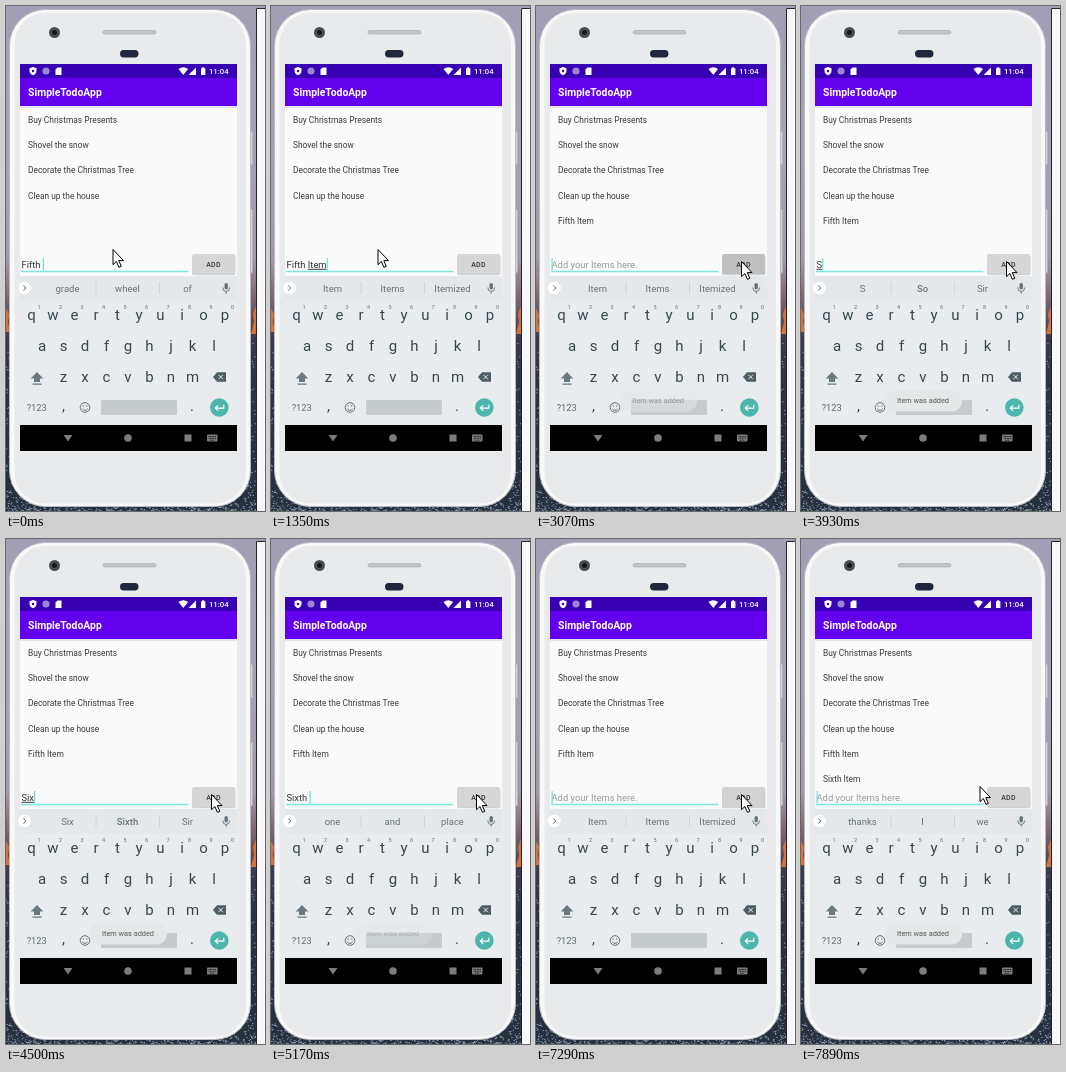
Recreate the animation shown at these times as an HTML page. Size 259 px wide and 505 px high, loop 8000 ms.

```html
<!DOCTYPE html>
<html lang="en">
<head>
<meta charset="utf-8">
<title>Todo app</title>
<style>
  html, body { margin: 0; height: 100%; overflow: hidden; }
  svg { display: block; width: 100vw; height: 100vh; font-family: Roboto, sans-serif; }
  text { white-space: pre; }
  .mid { text-anchor: middle; }
  .bold { font-weight: 500; }
  .item { font-size: 8.4px; fill: #3a3a3a; }
  .field { font-size: 9.4px; fill: #333; }
  .composing { text-decoration: underline; }
  .word { font-size: 9.5px; fill: #66727a; }
  .key { font-size: 15px; fill: #37474f; }
  .digit { font-size: 5.5px; fill: #65727a; }
</style>
</head>
<body>
<svg viewBox="0 0 259 505" preserveAspectRatio="none">
  <defs>
    <linearGradient id="dusk" x2="0" y2="1">
      <stop offset="0" stop-color="#a19fb5"/>
      <stop offset=".3" stop-color="#a6a1b7"/>
      <stop offset=".5" stop-color="#a598a8"/>
      <stop offset=".58" stop-color="#7d6470"/>
      <stop offset=".66" stop-color="#3a3a4d"/>
      <stop offset=".75" stop-color="#2b3345"/>
      <stop offset="1" stop-color="#27303f"/>
    </linearGradient>
  </defs>

  <!-- Desktop -->
  <rect width="259" height="505" fill="url(#dusk)"/>
  <path d="M0 302l3 6-1 8 2 10H0zM250 300l-3 8 1 8-3 12h5z" fill="#d5713c"/>
  <path id="snow" fill="#8f9bb0"/>
  <path d="M250 505V2h9V505z" fill="#f8f8fa"/>
  <path d="M250.5 505V2.5H259" fill="none" stroke="#23232b"/>

  <!-- Phone -->
  <g fill="#d5d7da" stroke="#a9acb1" stroke-width=".6">
    <rect x="242" y="125" width="4.500" height="34" rx="1.500"/>
    <rect x="242" y="203" width="4.500" height="64" rx="1.500"/>
  </g>
  <rect x="3.500" y="3.500" width="241" height="497" rx="36" fill="#f8f8f9" stroke="#b9bac0"/>
  <rect x="8.500" y="7" width="231.500" height="490.500" rx="31" fill="#e8eaec"/>
  <circle cx="48.500" cy="26.500" r="5.500" fill="#4a4d52"/>
  <circle cx="48.500" cy="26.500" r="2.500" fill="#15171c"/>
  <rect x="97" y="24.500" width="53" height="3.500" rx="1.700" fill="#c2c4c7" stroke="#a5a8ac" stroke-width=".6"/>
  <rect x="114" y="44" width="18.500" height="7.500" rx="3.700" fill="#20273c"/>

  <!-- App -->
  <rect x="14" y="58" width="217" height="387" fill="#fafafa"/>
  <rect x="14" y="100" width="217" height="2" fill="#e6e3ee"/>
  <rect x="14" y="72" width="217" height="28" fill="#6200ee"/>
  <rect x="14" y="58" width="217" height="14" fill="#3700b3"/>
  <g fill="#fff">
    <path d="M27 61l3.500 1.300v2.500q0 3-3.500 4.500-3.500-1.500-3.500-4.500v-2.500z"/>
    <circle cx="27" cy="65" r="1.200" fill="#3700b3"/>
    <circle cx="40" cy="65" r="3.600" fill="#9c84d5"/>
    <path d="M49.500 63.500l2-2H55.500v7.500h-6z"/>
    <path d="M172.500 63q4.800-3.400 9.600 0l-4.800 6zM190 61.500v7.500h-7.500z"/>
    <path d="M195 62.300h1.200v-1h2v1h1.200V69H195z"/>
    <text class="bold" x="203" y="68" font-size="7.700">11:04</text>
    <text x="22" y="90" font-size="10.400" font-weight="700">SimpleTodoApp</text>
  </g>
  <g id="list"></g>
  <path d="M15 265.500H182.500" stroke="#7ee6de" stroke-width="1.500"/>
  <text id="field" class="field" x="15.500" y="261.800"></text>
  <rect id="caret" y="252" width="1.200" height="12.500" fill="#6be0d7"/>
  <rect x="186" y="249" width="43.500" height="20.300" rx="2" fill="#cfd0d1"/>
  <rect id="button" x="186.300" y="248" width="42.700" height="20" rx="1.500"/>
  <text class="mid bold" x="207.500" y="260.500" font-size="7" letter-spacing=".3" fill="#333">ADD</text>

  <!-- Keyboard -->
  <rect x="14" y="270" width="217" height="149" fill="#e8ecee"/>
  <rect x="14" y="270" width="217" height="24.500" fill="#e4e8ea"/>
  <circle cx="18.500" cy="282" r="6.300" fill="#fff"/>
  <path d="M17.300 279.500l2.500 2.500-2.500 2.500" fill="none" stroke="#55636b"/>
  <path d="M90 276v12M153.500 276v12" stroke="#c9ced1" stroke-width=".8"/>
  <g id="words"></g>
  <rect x="218.500" y="277" width="3.400" height="6.500" rx="1.700" fill="#66737a"/>
  <path d="M216.800 281.500q0 4 3.400 4t3.400-4M220.200 285.500v2.300" fill="none" stroke="#66737a" stroke-width=".9"/>
  <g id="keys"></g>
  <path d="M31 366l6.300 6.500h-3.300v3.500h-6v-3.500h-3.300zM26.500 377.500h9v1.200h-9z" fill="#6b787f"/>
  <path d="M207 371l4-4.800h9v9.600h-9z" fill="#4e5c63"/>
  <path d="M212.500 368.800l4.400 4.400m0-4.400l-4.400 4.400" stroke="#e8ecee"/>
  <text class="mid" x="30.700" y="404.800" font-size="9.300" fill="#5f6c73">?123</text>
  <g fill="none" stroke="#56646b" stroke-width=".9">
    <circle cx="79" cy="401.500" r="4.800"/>
    <path d="M76.300 402.800q2.700 3.200 5.400 0M77.200 399.200v1.400M80.800 399.200v1.400"/>
  </g>
  <rect x="95" y="394" width="76" height="15" rx=".8" fill="#c6cbcd"/>
  <circle cx="213.300" cy="401.500" r="9.300" fill="#4db6ac"/>
  <path d="M217.800 398.800v3.300h-8.500m2.800-2.800l-2.800 2.800 2.800 2.800" fill="none" stroke="#fff" stroke-width="1.200"/>
  <g id="toast">
    <rect x="83.500" y="384.500" width="77.500" height="21" rx="10" fill="#e5e8e9"/>
    <text x="96" y="396.800" font-size="7.350" fill="#555">Item was added</text>
  </g>

  <!-- Navigation bar -->
  <rect x="14" y="419" width="217" height="26"/>
  <g fill="#7c7c7c">
    <path d="M57.500 429h9l-4.500 6.500z"/>
    <circle cx="122" cy="432" r="3.800"/>
    <rect x="178.500" y="428.500" width="7" height="7"/>
    <rect x="201" y="428.500" width="10.500" height="7" rx=".8"/>
    <path d="M202.500 430.500h7.500M202.500 432.300h7.500M204 434.200h4.500" stroke="#000" stroke-width=".8" stroke-dasharray="1 .6"/>
  </g>
  <path id="mouse" d="M.5.5v15.200l3.400-3.200 2.500 5.800 2.400-1-2.500-5.700h4.700z" fill="#fff" stroke="#000"/>
</svg>
<script>
const DURATION = 8000;
const $ = id => document.getElementById(id);
const label = (cls, x, y, s) => `<text class="${cls}" x="${x}" y="${y}">${s}</text>`;

// Each table row starts at its time and holds until the next one.
const at = (table, t) => table.findLast(row => row[0] <= t);

// time, typed text, word being composed
const typing = [
  [0, "Fifth ", ""], [120, "Fifth ", "I"], [1110, "Fifth ", "It"], [1230, "Fifth ", "Ite"],
  [1350, "Fifth ", "Item"], [2830, "", ""], [3930, "", "S"], [4220, "", "Si"],
  [4500, "", "Six"], [4780, "", "Sixt"], [5020, "", "Sixth"], [5170, "Sixth ", ""],
  [5720, "Sixth ", "I"], [6120, "Sixth ", "It"], [6270, "Sixth ", "Ite"],
  [6390, "Sixth ", "Item"], [7290, "", ""]
];
const suggestions = {
  I: "I I'm If", It: "It It's I", Ite: "Ite *Item Items", Item: "Item Items Itemized",
  S: "S *So Sir", Si: "Si *Six Since", Six: "Six *Sixth Sir", Sixt: "Sixt *Sixth Sixty",
  Sixth: "Sixth Sixty Sixths", "Fifth ": "grade wheel of", "Sixth ": "one and place"
};
const mousePath = [
  [0, 106.5, 243], [2190, 140, 257], [2310, 195, 267], [2430, 228, 256],
  [2580, 205, 255], [7770, 190, 250], [7890, 178.5, 247]
];
const caretOff = [[680, 1110], [1910, 2430], [6920, 7290]];
const presses = [2830, 7290];
const pressShade = [[0, 210], [120, 198], [240, 192], [360, 202], [480, 210], [600, 214]];
const toastFade = [
  [0, 0], [3070, .5], [3190, .85], [3310, 1], [5020, .6], [5170, .25], [5290, 0],
  [7530, .5], [7650, .85], [7770, 1]
];
const items = [
  [0, "Buy Christmas Presents"], [0, "Shovel the snow"], [0, "Decorate the Christmas Tree"],
  [0, "Clean up the house"], [2950, "Fifth Item"], [7410, "Sixth Item"]
];

// Snowy ground: seeded specks, denser towards the bottom
let seed = 7;
const random = () => (seed = seed * 16807 % 2147483647) / 2147483647;
$("snow").setAttribute("d", Array.from({ length: 2200 }, () =>
  `M${random() * 250} ${505 - 170 * random() ** 2}h1.2v1h-1.2z`).join(""));

const keyRow = (chars, x, y) =>
  [...chars].map((c, i) => label("key mid", x + i * 21.5, y, c)).join("");
$("keys").innerHTML =
  keyRow("qwertyuiop", 25.5, 314) + keyRow("asdfghjkl", 36, 345) + keyRow("zxcvbnm", 57.5, 375.7) +
  label("key mid", 57.5, 405, ",") + label("key mid", 186, 405, ".") +
  [..."1234567890"].map((c, i) => label("digit mid", 33 + i * 21.5, 303, c)).join("");
$("list").innerHTML = items.map((row, i) => label("item", 22, 116.8 + i * 25.3, row[1])).join("");

function drawField(t) {
  const [start, head, word] = at(typing, t);
  const empty = !head && !word;
  const field = $("field");
  field.innerHTML = empty ? "Add your Items here." : `${head}<tspan class="composing">${word}</tspan>`;
  field.style.fill = empty ? "#9b9b9b" : "";
  $("caret").setAttribute("x", 15.5 + (empty ? 0 : field.getComputedTextLength()));
  $("caret").style.opacity = caretOff.some(([a, b]) => t >= a && t < b) ? 0 : 1;

  const cleared = t - start < 480 ? suggestions.Item : "thanks I we";
  const words = empty ? cleared : suggestions[word || head];
  $("words").innerHTML = words.split(" ").map((w, i) =>
    label(w[0] === "*" ? "word mid bold" : "word mid", 61.5 + i * 60, 285.5, w.replace("*", ""))).join("");
}

function draw(now) {
  const t = now % DURATION;
  drawField(t);
  items.forEach(([time], i) => $("list").children[i].style.opacity = +(t >= time));
  const press = presses.findLast(p => p <= t);
  const shade = press === undefined ? 214 : at(pressShade, t - press)[1];
  $("button").setAttribute("fill", `rgb(${shade},${shade},${shade})`);
  $("toast").setAttribute("opacity", at(toastFade, t)[1]);
  const [, x, y] = at(mousePath, t);
  $("mouse").setAttribute("transform", `translate(${x} ${y})`);
  requestAnimationFrame(() => draw(performance.now()));
}
draw(performance.now());
</script>
</body>
</html>
```
